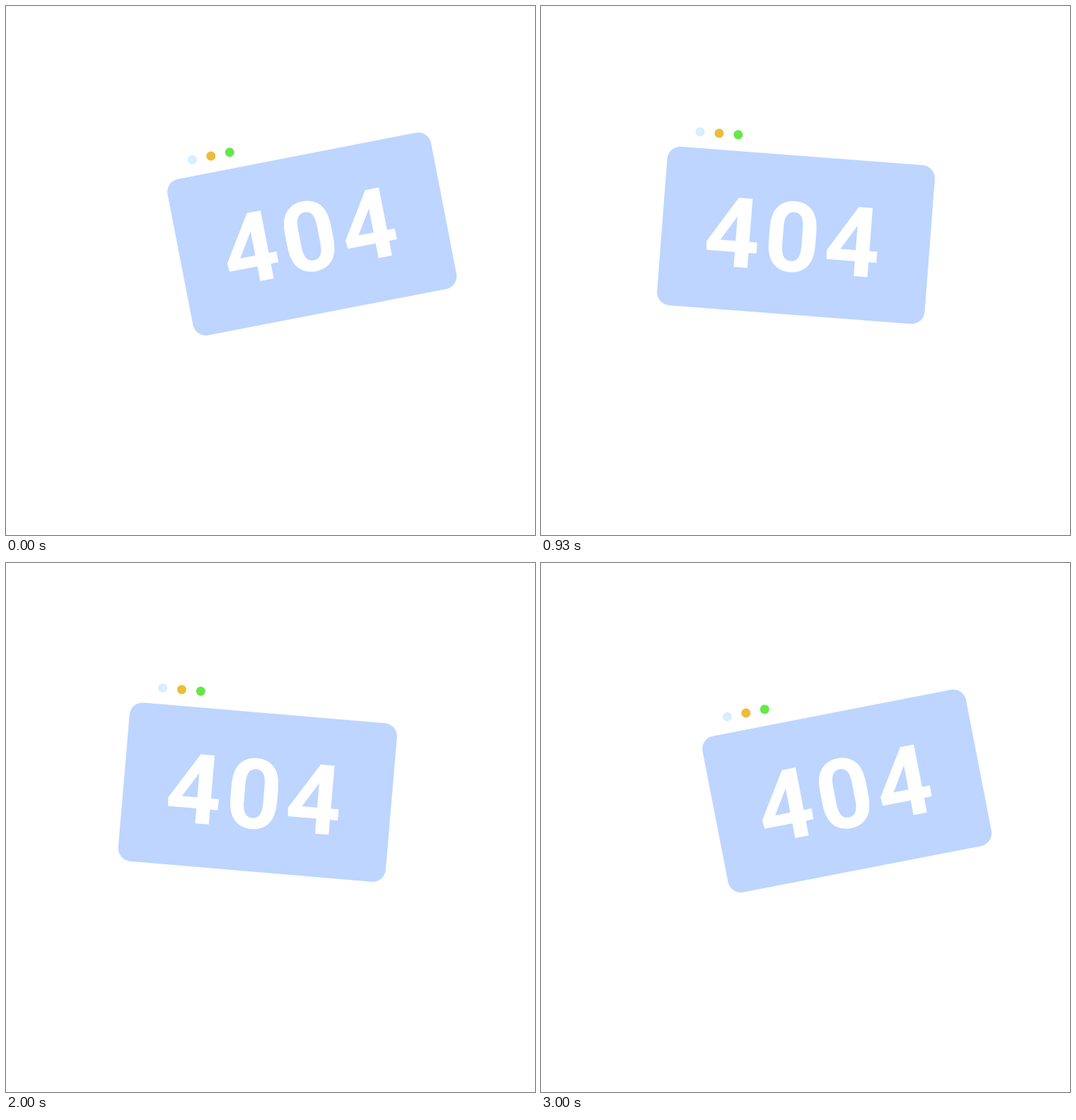
Write an HTML page with a canvas that moves like this. It is 748 px wide and 748 px high and loops after 3.03 s.

```html
<!DOCTYPE html>
<html lang="en">
<head>
<meta charset="utf-8">
<title>404</title>
<style>
  html, body { margin: 0; width: 100%; height: 100%; overflow: hidden; background: #fff; }
  canvas { display: block; }
</style>
</head>
<body>
<canvas id="stage" width="748" height="748" aria-label="404"></canvas>
<script>
const ctx = document.getElementById('stage').getContext('2d');
const LOOP = 3030;
const SWING = 3000;
const STEP = 100 / 3;
const DOTS = [[-146, '#d7efff'], [-119, '#ecbc3b'], [-92, '#64e748']];

const smooth = u => u * u * (3 - 2 * u);

// 0 -> 1 until the turn, then back to 0 at the end of the swing
const there = (t, turn) =>
  smooth(t < turn ? t / turn : (SWING - t) / (SWING - turn));

// Steps of 1/30 s whose starts are rounded to 10 ms
function stepTime(t) {
  let k = Math.floor((t + 3.4) / STEP);
  if (Math.round(k * STEP / 10) * 10 > t) k--;
  return Math.min(Math.max(k, 0) * STEP, SWING);
}

function drawCard() {
  ctx.fillStyle = '#bdd5ff';
  ctx.beginPath();
  ctx.roundRect(-189.5, 0, 379.5, 225, 18.5);
  ctx.fill();

  for (const [x, color] of DOTS) {
    ctx.fillStyle = color;
    ctx.beginPath();
    ctx.arc(x, -23, 6.5, 0, Math.PI * 2);
    ctx.fill();
  }

  ctx.fillStyle = '#fff';
  ctx.font = 'bold 137.8px Roboto, "Liberation Sans", sans-serif';
  ctx.letterSpacing = '6.1px';
  ctx.fillText('404', -129, 163.8);
}

function draw(now) {
  const t = stepTime(now % LOOP);
  const angle = -11 + 22 * there(t, 44 * STEP);
  const x = 411 - 62 * there(t, 1500);

  ctx.setTransform(1, 0, 0, 1, 0, 0);
  ctx.fillStyle = '#fff';
  ctx.fillRect(0, 0, 748, 748);
  ctx.translate(x, 212);
  ctx.rotate(angle * Math.PI / 180);
  drawCard();
}

let start;
function tick(now) {
  start ??= now;
  draw(Math.max(0, now - start));
  requestAnimationFrame(tick);
}
draw(0);
requestAnimationFrame(tick);
</script>
</body>
</html>
```
